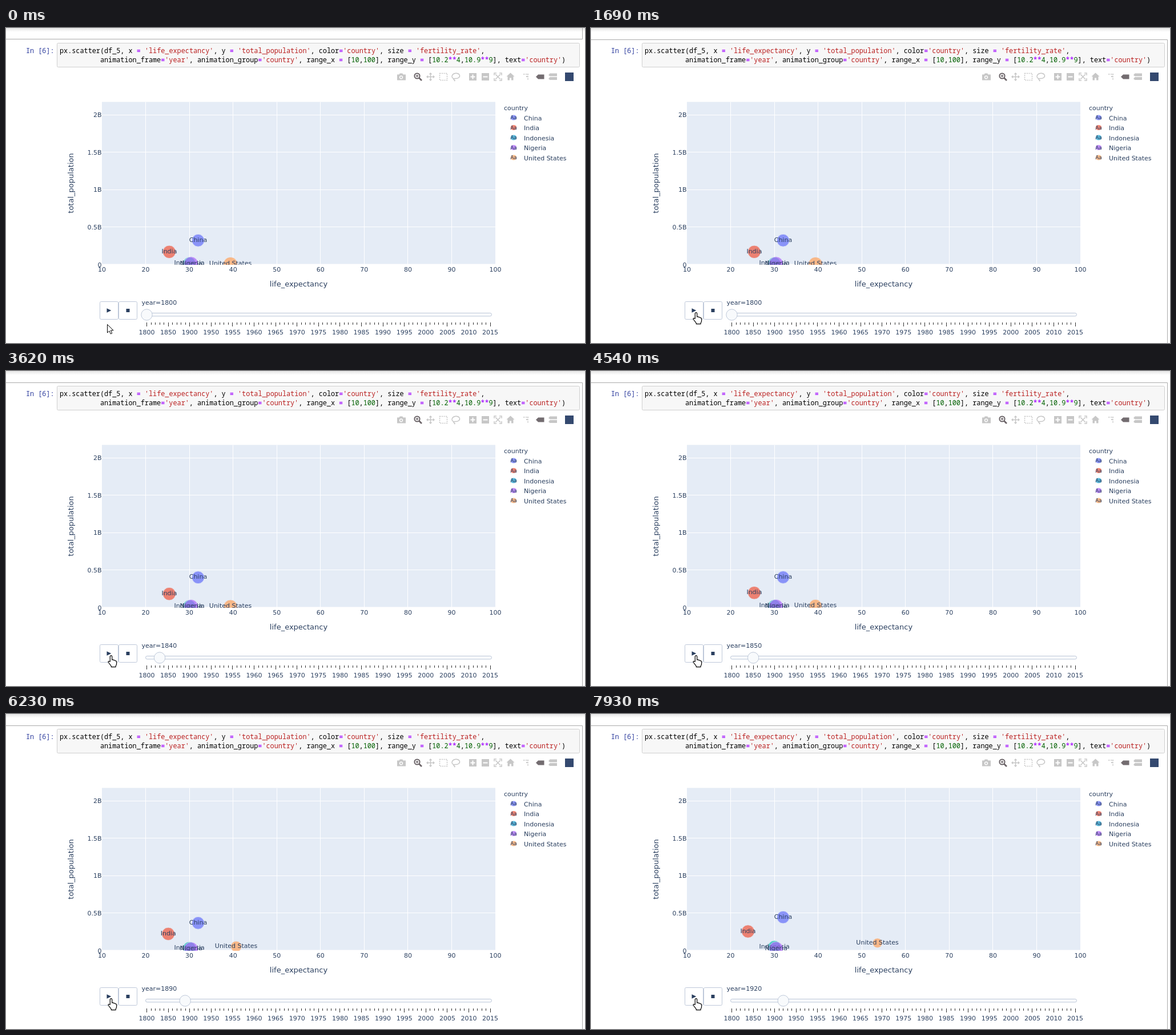
An HTML page that plays this animation: 1014 by 552 pixels, repeating every 8 s.

```html
<!DOCTYPE html>
<html lang="en">
<head>
<meta charset="utf-8">
<title>Population by life expectancy</title>
<style>
html, body { margin: 0; width: 100%; height: 100%; overflow: hidden; background: #fff; }
svg { display: block; width: 1014px; height: 552px; }
text { font: 11px "DejaVu Sans", sans-serif; fill: #2a3f5f; white-space: pre; }
.mid { text-anchor: middle; }
.end { text-anchor: end; }
.title { font-size: 13px; text-anchor: middle; }
.key { font-size: 9px; text-anchor: middle; }
.code { font: 11.82px "Noto Sans Mono", monospace; fill: #000; }
.prompt { fill: #303f9f; }
.s { fill: #ba2121; }
.o { fill: #aa22ff; font-weight: bold; }
.n { fill: #006000; }
.control { fill: #fff; stroke: #bec8d9; }
.slide { fill: #f8fafc; stroke: #bec8d9; }
.bar { fill: #c7c7c7; }
.bar .line { fill: none; stroke: #c7c7c7; stroke-width: 1.5; }
.cell { fill: none; stroke: #ababab; }
</style>
</head>
<body>
<svg viewBox="0 0 1014 552">
  <defs>
    <linearGradient id="shade" x2="0" y2="1">
      <stop offset="0" stop-color="#e6e6e6"/><stop offset="1" stop-color="#fff"/>
    </linearGradient>
    <clipPath id="plot"><path d="M168 129.5H857V415H168Z"/></clipPath>
  </defs>
  <rect width="1014" height="7" fill="url(#shade)"/>
  <path id="cellAbove" class="cell" d="M0 19.5H1009.5V0"/>
  <path id="cellHere" class="cell" d="M0 20.5H1009.5V552"/>
  <rect x="89.5" y="26.5" width="915" height="42" rx="2" fill="#f7f7f7" stroke="#cfcfcf"/>
  <text class="code prompt" x="35" y="44">In [6]:</text>
  <g id="code"></g>

  <g class="bar">
    <path fill-rule="evenodd" d="M685 81.5h3.5l1.2-2h4.6l1.2 2h4.5v10h-15zM692 83.2a3.2 3.2 0 1 0 .01 0zM692 84.7a1.7 1.7 0 1 1-.01 0z"/>
    <g fill="none" stroke="#6b6468">
      <circle cx="720" cy="84" r="4.6" stroke-width="2"/>
      <path d="M723.5 87.5l4.5 4.5" stroke-width="2.6"/>
      <path d="M717.7 84h4.6M720 81.7v4.6" stroke-width="1.3"/>
    </g>
    <path class="line" d="M737 85.5h13M743.5 79v13"/>
    <path d="M743.5 78l2.8 3.2h-5.6zM743.5 93l2.8-3.2h-5.6zM736 85.5l3.2-2.8v5.6zM751 85.5l-3.2-2.8v5.6z"/>
    <path class="line" stroke-dasharray="2 1.5" d="M759.5 79.5h13v12h-13z"/>
    <path class="line" d="M785 89c-4-1-5-4-3-7 3-4 10-3.5 12 0s-2 7-7 6.5c-3-.5-4 1.5-2 2.5s1 1.5 0 2"/>
    <path fill-rule="evenodd" d="M811 79h13v13h-13zM816.5 81.5v3h-3v2h3v3h2v-3h3v-2h-3v-3z"/>
    <path fill-rule="evenodd" d="M833 79h13v13h-13zM835.5 84.5v2h8v-2z"/>
    <path class="line" d="M855 83v-4h4M864 79h4v4M868 88v4h-4M859 92h-4v-4M857 81l9 9M866 81l-9 9"/>
    <path d="M883.5 78.5l7 6.5h-2v6.5h-3.5v-4h-3v4h-3.5v-6.5h-2z"/>
    <path class="line" stroke-dasharray="2.5 1.5" d="M906 81h9M914 80v11"/>
    <path d="M911 84h2v2h-2z"/>
    <path fill="#736c70" d="M928 85.5l4-4h10.5v8h-10.5z"/>
    <path d="M950 82.5l2.5-3H965v5h-12.5zM950 89l2.5-3H965v5h-12.5z"/>
    <rect x="979" y="78" width="15" height="15" fill="#34496f"/>
  </g>

  <path fill="#e5ecf6" d="M168 129.5H857V415H168Z"/>
  <g id="grid"></g>
  <g id="marks" clip-path="url(#plot)"></g>
  <text class="title" x="512.5" y="453">life_expectancy</text>
  <text class="title" transform="translate(118 272) rotate(-90)">total_population</text>
  <text x="872" y="144">country</text>
  <g id="legend"></g>

  <rect class="control" x="164.5" y="479.5" width="32" height="31" rx="2"/>
  <rect class="control" x="197.5" y="479.5" width="32" height="31" rx="2"/>
  <path fill="#2a3f5f" d="M176.5 491.2v7.6l7.8-3.8zM210.5 492h6v6h-6z"/>
  <text id="year" x="237.5" y="485"></text>
  <rect class="slide" x="244.5" y="499.5" width="606" height="5.5" rx="2.7"/>
  <circle id="grip" class="slide" cy="502.5" r="9.7"/>
  <g id="ticks"></g>
  <g id="cursor" fill="#fff" stroke="#000" stroke-linejoin="round">
    <path id="arrow" d="M0 0V14.5L3.4 11.4 5.8 16.6 8.2 15.5 5.9 10.4H10.6Z"/>
    <path id="hand" transform="translate(-4.7 .2)" stroke-width="1.2" d="M4 11V2.2a1.7 1.7 0 0 1 3.4 0V8l1-.3c1.4-.2 2 .4 2.2 1.1 1.4-.5 2.3 0 2.5 1 1.3-.3 2.2.3 2.2 1.6V15c0 1.5-1 2.5-1.5 4v1.5H6V19C5 17 2.5 14.5 1 12.3c-.8-1.6 1-2.4 2-1.3z"/>
  </g>
</svg>
<script>
const LOOP = 8000, PLAY = 2110, STEP = 501, SLIDE = 150, SELECT = 1690;
const $ = id => document.getElementById(id);

function set(el, attrs) {
  for (const key in attrs) el.setAttribute(key, attrs[key]);
}
function add(parent, tag, attrs, text) {
  const el = document.createElementNS('http://www.w3.org/2000/svg', tag);
  set(el, attrs);
  if (text !== undefined) el.textContent = text;
  return parent.appendChild(el);
}
const mix = (a, b, t) => a + (b - a) * t;
const clamp = t => Math.min(1, Math.max(0, t));
const cubic = t => t < .5 ? 4 * t ** 3 : 1 - 4 * (1 - t) ** 3;
const crisp = v => Math.floor(v) + .5;

const xAt = life => 168 + (life - 10) * 7.656;
const yAt = millions => 414.5 - millions * .1312;
const gripAt = i => 246.5 + i * 7.52;

// One value per decade from 1800; a plain number stays constant.
const countries = [
  { name: 'China', color: '#636efa', fertility: 5.5,
    life: [32, 32, 32, 32, 32, 32, 28.9, 32, 32, 32, 32, 32, 32],
    people: [322, 350, 380, 402, 411, 403, 380, 364, 365, 377, 395, 418, 461] },
  { name: 'India', color: '#ef553b', fertility: 5.9,
    life: [25.4, 25.4, 25.4, 25.4, 25.4, 25.4, 23.1, 25.4, 25.4, 24.4, 18.3, 21.8, 25.3],
    people: [169, 172, 176, 182, 190, 197, 204, 211, 220, 229, 239, 249, 259] },
  { name: 'Indonesia', color: '#10bdb4', key: '#19a0d0', fertility: 5.5, life: 30,
    people: [16, 16.5, 17.2, 18, 20, 23, 26, 29, 33, 37, 42, 47, 52] },
  { name: 'Nigeria', color: '#ab63fa', fertility: 6.8, life: 30.4,
    people: [12, 12.6, 13.4, 14.5, 15.5, 16.5, 17.5, 18.5, 19.7, 21, 22.5, 24, 26] },
  { name: 'United States', color: '#ffa15a',
    fertility: [7, 6.9, 6.7, 6.5, 6.1, 5.7, 5, 4.6, 4.2, 4, 3.7, 3.4, 3.2],
    life: [39.4, 39.4, 39.4, 39.4, 39.4, 39.4, 39.4, 39.4, 39.4, 45.2, 48.9, 51.1, 55.1],
    people: [6, 8, 10, 13, 17, 24, 31, 40, 51, 63, 76, 92, 106] }
];
const valueAt = (v, i, t) => Array.isArray(v) ? mix(v[Math.max(0, i - 1)], v[i], t) : v;

// Code lines with their strings, operators and numbers coloured.
const lines = [
  "px.scatter(df_5, x = 'life_expectancy', y = 'total_population', color='country', size = 'fertility_rate',",
  "          animation_frame='year', animation_group='country', range_x = [10,100], range_y = [10.2**4,10.9**9], text='country')"
];
lines.forEach((line, row) => {
  const el = add($('code'), 'text', { class: 'code', x: 94, y: 44 + row * 16 });
  for (const part of line.match(/'[^']*'|=|\*\*|\b\d+(\.\d+)?|[a-z_]\w*|[^'=*\da-z_]+/g)) {
    const kind = part[0] === "'" ? 's' : /^[=*]/.test(part) ? 'o' : /^\d/.test(part) ? 'n' : '';
    add(el, 'tspan', { class: kind }, part);
  }
});

const grid = $('grid');
for (let life = 10; life <= 100; life += 10) {
  const x = xAt(life);
  if (life > 10 && life < 100) add(grid, 'path', { d: `M${crisp(x)} 129.5V415`, stroke: '#fff' });
  add(grid, 'text', { class: 'mid', x, y: 427 }, life);
}
['0', '0.5B', '1B', '1.5B', '2B'].forEach((label, i) => {
  const y = yAt(i * 500);
  add(grid, 'path', { d: `M168 ${crisp(y)}H857`, stroke: '#fff', 'stroke-width': i ? 1 : 2 });
  add(grid, 'text', { class: 'end', x: 167.5, y: y + 4 }, label);
});

for (let i = 0; i <= 80; i++) {
  const x = gripAt(i), major = i % 5 === 0;
  add($('ticks'), 'path', { d: `M${crisp(x)} 516v${major ? 7 : 4}`, stroke: '#333' });
  if (major) add($('ticks'), 'text', { class: 'mid', x, y: 537 }, i < 15 ? 1800 + i * 10 : 1935 + i);
}

countries.forEach((c, i) => {
  const y = 157.5 + i * 17.5;
  add($('legend'), 'ellipse', { cx: 889, cy: y - .5, rx: 5.3, ry: 4.6, fill: c.key || c.color, opacity: .7 });
  add($('legend'), 'text', { class: 'key', x: 889, y: y + 2.5 }, 'Aa');
  add($('legend'), 'text', { x: 907, y: y + 4 }, c.name);
  c.dot = add($('marks'), 'circle', { fill: c.color, stroke: '#e5ecf6', 'stroke-width': .8, opacity: .7 });
  c.label = add($('marks'), 'text', { class: 'mid' }, c.name);
});

function drawCursor(t) {
  const a = cubic(clamp((t - 70) / 760)), b = clamp((t - 850) / 210);
  const x = mix(mix(177.5, 193, a), 183, b), y = mix(mix(519.5, 503, a), 498, b);
  const over = y < 511;
  set($('cursor'), { transform: `translate(${x} ${y})` });
  set($('arrow'), { visibility: over ? 'hidden' : 'visible' });
  set($('hand'), { visibility: over ? 'visible' : 'hidden' });
}

function draw(t) {
  const i = Math.min(12, Math.max(0, Math.floor((t - PLAY) / STEP) + 1));
  const since = i ? t - PLAY - (i - 1) * STEP : 0;
  const p = clamp(since / STEP);
  for (const c of countries) {
    const x = xAt(valueAt(c.life, i, p)), y = yAt(valueAt(c.people, i, p));
    set(c.dot, { cx: x, cy: y, r: 4.65 * Math.sqrt(valueAt(c.fertility, i, p)) });
    set(c.label, { x, y: y + 2.6 });
  }
  $('year').textContent = 'year=' + (1800 + i * 10);
  set($('grip'), { cx: mix(gripAt(Math.max(0, i - 1)), gripAt(i), cubic(clamp(since / SLIDE))) });
  set($('cellAbove'), { visibility: t < SELECT ? 'visible' : 'hidden' });
  set($('cellHere'), { visibility: t < SELECT ? 'hidden' : 'visible' });
  drawCursor(t);
}

const start = performance.now();
function tick() {
  draw((performance.now() - start) % LOOP);
  requestAnimationFrame(tick);
}
draw(0);
requestAnimationFrame(tick);
</script>
</body>
</html>
```
